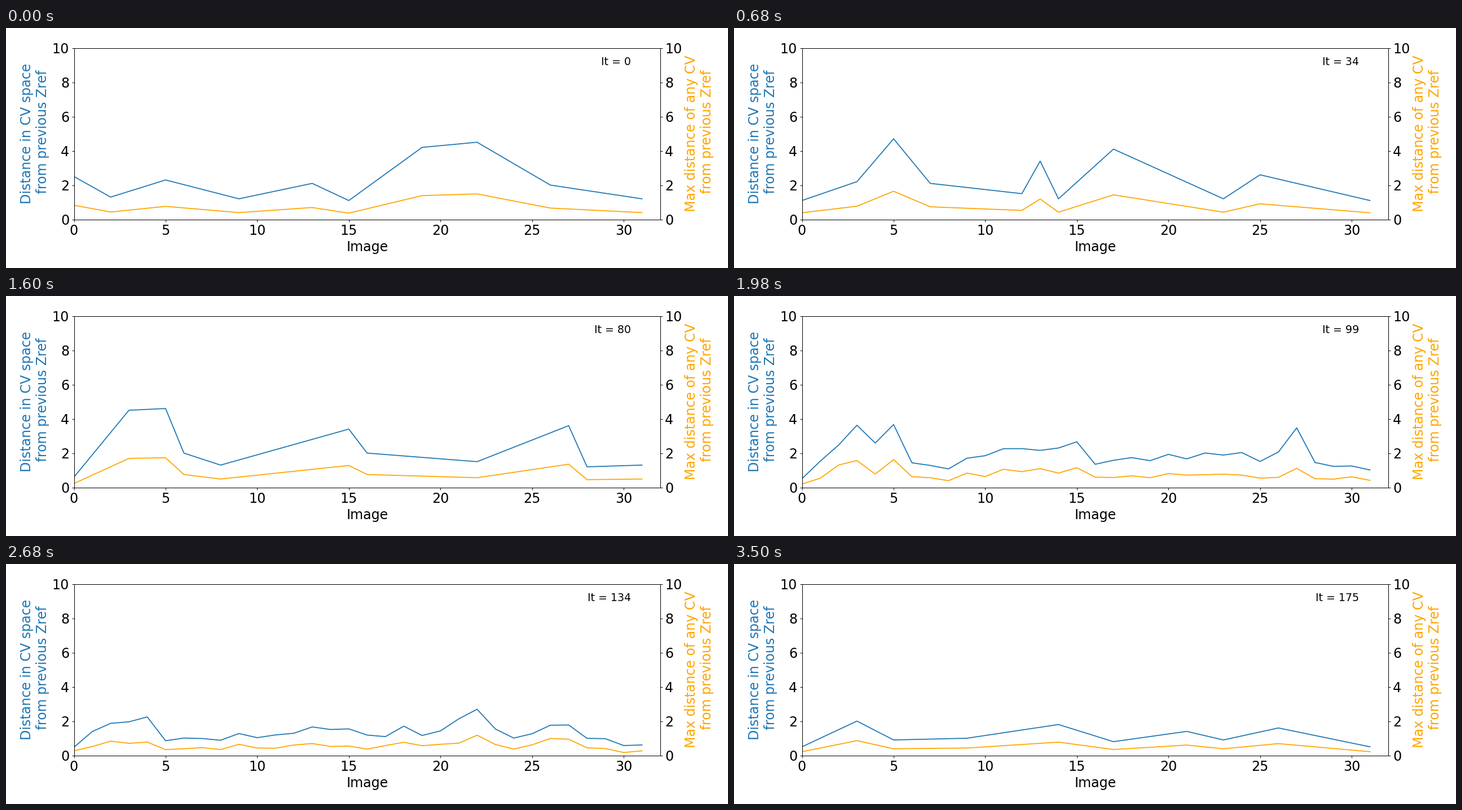
A matplotlib script for the animation above (3520 ms loop, 1280 px wide and 427 px high).

```python
import numpy as np
import matplotlib.pyplot as plt
from matplotlib.animation import FuncAnimation

W, H, DPI = 1280, 427, 64
K = 4 / 3  # point sizes are meant for a figure 15 inches wide
N_FRAMES, INTERVAL, N_IMAGES = 176, 20, 32
BLUE, ORANGE = "#1f77b4", "orange"

plt.rcParams.update({
    "font.family": "DejaVu Sans",
    "font.size": 20 * K,
    "axes.linewidth": 0.8 * K,
    "axes.labelpad": 4 * K,
    "lines.linewidth": 1.5 * K,
})
for axis in ("xtick", "ytick"):
    plt.rcParams.update({
        f"{axis}.major.size": 3.5 * K,
        f"{axis}.major.width": 0.8 * K,
        f"{axis}.major.pad": 3.5 * K,
    })

images = np.arange(N_IMAGES)


def shape(*points):
    """Polyline over all images through a few (image, distance) turns."""
    x, y = zip(*points)
    return np.interp(images, x, y)


# Main peaks and valleys at a few iterations
SHAPES = {
    0: shape((0, 2.5), (2, 1.3), (5, 2.3), (9, 1.2), (13, 2.1), (15, 1.1),
             (19, 4.2), (22, 4.5), (26, 2), (31, 1.2)),
    34: shape((0, 1.1), (3, 2.2), (5, 4.7), (7, 2.1), (12, 1.5), (13, 3.4),
              (14, 1.2), (17, 4.1), (23, 1.2), (25, 2.6), (31, 1.1)),
    56: shape((0, 0.8), (5, 5.3), (6, 2.2), (8, 1.4), (11, 2.3), (22, 2),
              (26, 4.5), (28, 1.5), (31, 0.7)),
    80: shape((0, 0.6), (3, 4.5), (5, 4.6), (6, 2), (8, 1.3), (15, 3.4),
              (16, 2), (22, 1.5), (27, 3.6), (28, 1.2), (31, 1.3)),
    118: shape((0, 0.4), (1, 1.4), (4, 2.3), (5, 1), (11, 1.5), (16, 1.1),
               (22, 2.1), (25, 1.1), (27, 2), (31, 0.5)),
    150: shape((0, 0.4), (1, 1.4), (4, 2.6), (5, 1), (8, 0.8), (13, 1.8),
               (20, 1), (22, 2.2), (24, 1.2), (27, 2), (28, 1), (31, 0.6)),
    175: shape((0, 0.5), (3, 2), (5, 0.9), (9, 1), (14, 1.8), (17, 0.8),
               (21, 1.4), (23, 0.9), (26, 1.6), (31, 0.5)),
}
STOPS = list(SHAPES)


def curves(it):
    """Drift between the shapes, with fresh scatter at each iteration."""
    k = max(np.searchsorted(STOPS, it) - 1, 0)
    start, end = STOPS[k], STOPS[k + 1]
    u = (it - start) / (end - start)
    rng = np.random.default_rng(it)
    spread = max(np.sin(np.pi * u), 0) ** 0.3
    shared, extra = spread * rng.normal(0, 0.16, (2, N_IMAGES))
    total = ((1 - u) * SHAPES[start] + u * SHAPES[end]) * np.exp(shared)
    ratio = 0.33 + 0.1 * it / N_FRAMES
    largest = np.maximum(ratio * total * np.exp(extra), 0.09)
    return total, largest


fig = plt.figure(figsize=(W / DPI, H / DPI), dpi=DPI, facecolor="white")
ax = fig.add_axes([120.5 / W, 1 - 340.5 / H, 1039.5 / W, 305 / H])
twin = ax.twinx()
ax.set_xlim(0, N_IMAGES)
ax.set_xticks(range(0, N_IMAGES, 5))
for axes in (ax, twin):
    axes.set_ylim(0, 10)
    axes.set_yticks(range(0, 11, 2))
ax.set_xlabel("Image")
ax.set_ylabel("Distance in CV space\n from previous Zref", color=BLUE)
twin.set_ylabel("Max distance of any CV\n from previous Zref", color=ORANGE)

total_line, = ax.plot([], [], color=BLUE)
max_line, = twin.plot([], [], color=ORANGE)
label = ax.text(0.95, 0.95, "", transform=ax.transAxes,
                ha="right", va="top", fontsize=16 * K)


def update(it):
    total, largest = curves(it)
    total_line.set_data(images, total)
    max_line.set_data(images, largest)
    label.set_text(f"It = {it}")
    return total_line, max_line, label


anim = FuncAnimation(fig, update, frames=N_FRAMES, interval=INTERVAL,
                     repeat=True, repeat_delay=0)
plt.show()
```
